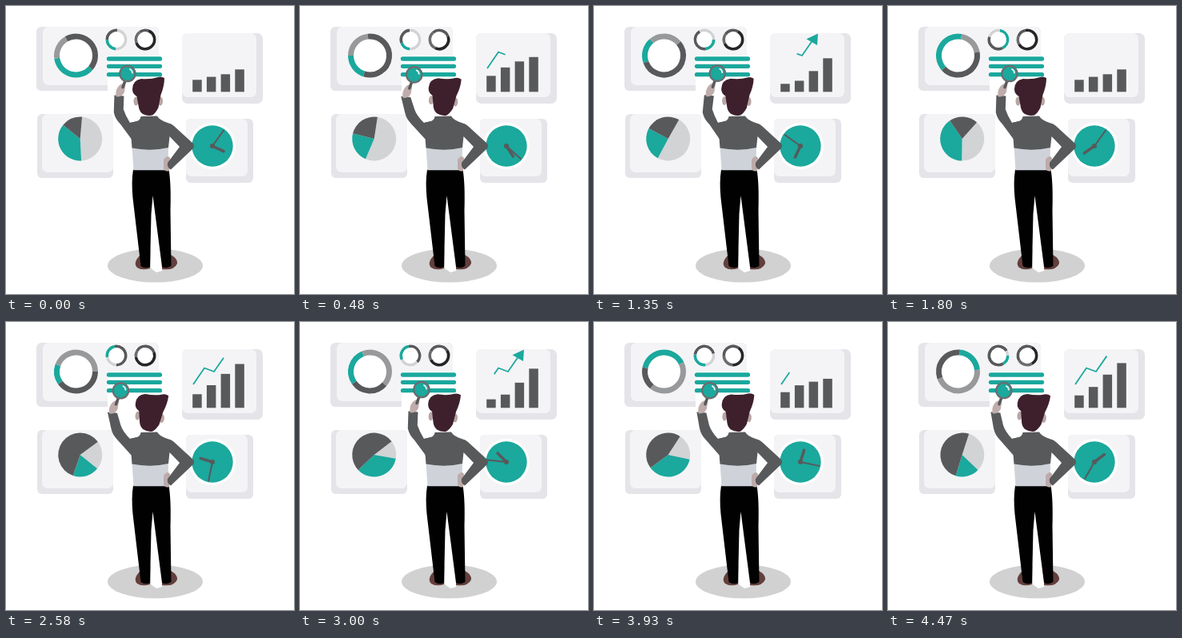
These frames come from a looping animation (360x360 px, 4.5 s). An HTML page:

```html
<!DOCTYPE html>
<html lang="en">
<head>
<meta charset="utf-8">
<title>Dashboard analysis</title>
<style>
html, body { margin: 0; width: 100%; height: 100%; overflow: hidden; background: #fff; }
svg { display: block; width: 100vw; height: 100vh; }
</style>
</head>
<body>
<svg viewBox="0 0 360 360">
  <!-- panels -->
  <g fill="#e4e4e9">
    <rect x="38" y="26" width="153" height="80" rx="6"/>
    <rect x="220" y="34" width="101" height="88" rx="7"/>
    <rect x="39" y="135" width="95" height="80" rx="6"/>
    <rect x="225" y="141" width="84" height="80" rx="6"/>
  </g>
  <g fill="#f4f4f6">
    <rect x="46" y="26" width="145" height="73" rx="7"/>
    <rect x="220" y="34" width="93" height="80" rx="7"/>
    <rect x="45" y="135" width="89" height="73" rx="7"/>
    <rect x="225" y="141" width="77" height="72" rx="7"/>
  </g>
  <path d="M127 62H196V110H127Z" fill="#fff"/>
  <g fill="#fff">
    <circle cx="87.5" cy="62" r="27.5"/>
    <circle cx="138" cy="42" r="14"/>
    <circle cx="174" cy="42" r="14"/>
    <circle cx="258" cy="175" r="29"/>
  </g>
  <g id="charts"></g>
  <path d="M128.500 66H192.500M128.500 75.300H192.500M128.500 85.700H192.500" stroke="#1ba89d" stroke-width="5.300" stroke-linecap="round"/>
  <g id="bars" fill="#58595b"></g>
  <path id="trend" fill="none" stroke="#1ba89d" stroke-width="1.800"/>
  <path id="head" d="M7.500 -10L-7 -3.200L6.500 4.500Z" fill="#1ba89d"/>

  <circle cx="258" cy="175" r="25.700" fill="#1ba89d"/>
  <g stroke="#58595b" stroke-linecap="round">
    <path id="minute" d="M258 175V151" stroke-width="2"/>
    <path id="hour" d="M258 175V159.500" stroke-width="3.500"/>
  </g>
  <circle cx="258" cy="175" r="3" fill="#58595b"/>

  <!-- person -->
  <ellipse cx="186.500" cy="324.500" rx="59.500" ry="21" fill="#d1d1d1"/>
  <path d="M181 236L185 236L196 311L195 331L188 333L181 328Z" fill="#fff"/>
  <path d="M168 311H180V328Q170 331 164 327Q158 321 168 311ZM195 311H206Q215 316 214 322Q210 331 195 329Z" fill="#633f3d"/>
  <path d="M159 204.500H203.500Q206.500 222 205.500 255L206.500 325Q200 329 195 326L183.500 237L181.500 260L180 326Q174 329 168.500 325L158.500 240Q156.500 220 159 204.500Z" fill="#010101"/>
  <path d="M157.500 176L203 175L202.500 205.300H159.500Z" fill="#cfd3d9"/>
  <path d="M197 192Q202 185 205 190L204 206Q199 208 197 203Z" fill="#bdabaa"/>
  <path d="M155 146L164 144Q168 142 168.500 138L189 137.500Q192 143 202 146Q207 147 210 150L234 172Q236 175 234 178L206 204.500Q201 202 202 196L217 176L204.500 163L203 177Q181 182 157.500 177.500Z" fill="#58595b"/>
  <path id="arm" fill="#58595b"/>
  <g id="skull">
    <ellipse cx="162.500" cy="119" rx="3" ry="5.500" fill="#b9a5a4"/>
    <ellipse cx="193" cy="119" rx="3" ry="5.500" fill="#b9a5a4"/>
    <path d="M158 104Q158 93 169 91Q181 92 190 89Q194 87.500 198 90Q198 100 193.500 111L190.500 127Q187 134 183 136.500Q177 138 171 135Q167 132 166 127L163.500 113Q158 110 158 104Z" fill="#3e202d"/>
  </g>
  <g id="glass">
    <path d="M-11.500 16Q-7 10 -2.500 14L-4 23Q-6 29 -14 29Q-16 22 -11.500 16Z" fill="#bfadab"/>
    <path d="M-3 9L-6 17" stroke="#58595b" stroke-width="3.500" stroke-linecap="round"/>
    <circle r="9.700" fill="#1ba89d" stroke="#6b6c6f" stroke-width="2.200"/>
    <path d="M3 -5.500Q6 -4 6 -1" fill="none" stroke="#e6f5f3" stroke-width="1.800" stroke-linecap="round"/>
  </g>
</svg>
<script>
const LOOP = 4500, BEAT = 1800;
const DARK = '#58595b', TEAL = '#1ba89d', GREY = '#98999b', LIGHT = '#d2d3d5';
const KEYS = [0, 480, 1350, 1800, 2580, 3420, 4470];
const $ = id => document.getElementById(id);
const set = (el, name, value) => el.setAttribute(name, value);
const clamp = x => Math.max(0, Math.min(1, x));
const ease = x => (1 - Math.cos(Math.PI * clamp(x))) / 2;
const wave = (t, delay) => Math.sin(2 * Math.PI * (t - delay) / BEAT);

function add(parent, tag, attrs) {
  const el = document.createElementNS('http://www.w3.org/2000/svg', tag);
  for (const name in attrs) set(el, name, attrs[name]);
  return parent.appendChild(el);
}

// Smooth track through values at KEYS, without overshoot
function track(values) {
  const gap = i => KEYS[i + 1] - KEYS[i];
  const slope = i => (values[i + 1] - values[i]) / gap(i);
  const tangent = i => {
    if (i === 0) return slope(0);
    if (i === KEYS.length - 1) return slope(i - 1);
    const a = slope(i - 1), b = slope(i);
    return a * b <= 0 ? 0 : 2 * a * b / (a + b);
  };
  return t => {
    let i = 0;
    while (i < KEYS.length - 2 && t > KEYS[i + 1]) i++;
    const h = gap(i), u = clamp((t - KEYS[i]) / h), v = 1 - u;
    return values[i] * v * v * (1 + 2 * u) + values[i + 1] * u * u * (3 - 2 * u)
      + h * u * v * (tangent(i) * v - tangent(i + 1) * u);
  };
}

function arc(cx, cy, r, from, to) {
  const point = deg => {
    const a = deg * Math.PI / 180;
    return (cx + r * Math.sin(a)).toFixed(2) + ' ' + (cy - r * Math.cos(a)).toFixed(2);
  };
  return `${point(from)}A${r} ${r} 0 ${to - from > 180 ? 1 : 0} 1 ${point(to)}`;
}

// Each chart: edges are the start angles of its slices, clockwise
const charts = [
  { x: 87.5, y: 62, r: 24, w: 7, colors: [TEAL, GREY, DARK], edges: [
    track([130, 198, 250, 228, 235, 235, 365]),
    track([262, 270, 320, 370, 290, 400, 445]),
    track([330, 354, 410, 440, 450, 545, 610])] },
  { x: 138, y: 42, r: 11.7, w: 3.6, colors: [TEAL, DARK, LIGHT], edges: [
    track([183, 183, 90, 8, -100, -130, -270]),
    track([270, 250, 175, 155, -10, -10, -210]),
    track([365, 355, 330, 287, 180, 100, 60])] },
  { x: 174, y: 42, r: 11.7, w: 3.6, colors: ['#6b6c6e', DARK, '#262628'], edges: [
    track([250, 205, 245, 240, 260, 215, 150]),
    track([325, 320, 305, 290, 300, 290, 240]),
    track([380, 430, 390, 350, 430, 400, 390])] },
  { x: 92.7, y: 166, r: 27.5, w: 0, colors: [LIGHT, TEAL, DARK], edges: [
    t => 5 + 49 * ease(t < 2700 ? t / 2700 : 2 - t / 2700),
    track([177, 203, 208, 181, 129, 84, 134]),
    track([309, 284, 298, 326, 199, 254, 197])] }
];
for (const c of charts) {
  c.parts = c.colors.map(color => add($('charts'), 'path', c.w
    ? { fill: 'none', stroke: color, 'stroke-width': c.w }
    : { fill: color }));
}

function drawChart(c, t) {
  const at = c.edges.map(edge => edge(t));
  at.push(at[0] + 360);
  c.parts.forEach((part, i) => {
    const line = arc(c.x, c.y, c.r, at[i], at[i + 1]);
    set(part, 'd', c.w ? 'M' + line : `M${c.x} ${c.y}L${line}Z`);
  });
}

const bars = [[15, 5, 0], [22, 8.8, 110], [31.5, 11, 300], [42, 14, 450]].map(([mid, amp, delay], i) => ({
  mid, amp, delay, el: add($('bars'), 'rect', { x: 233.2 + i * 17.7, width: 11.5 })
}));

// Part of the trend line between two fractions of its length
const TREND = [[234, 78], [248, 57.5], [260, 62], [273.5, 42.5]];
function trendPart(from, to) {
  const len = TREND.slice(1).map((p, i) => Math.hypot(p[0] - TREND[i][0], p[1] - TREND[i][1]));
  const total = len.reduce((a, b) => a + b);
  let done = 0, d = '';
  len.forEach((l, i) => {
    const a = clamp((from * total - done) / l), b = clamp((to * total - done) / l);
    const mix = u => TREND[i].map((v, k) => (v + (TREND[i + 1][k] - v) * u).toFixed(2)).join(' ');
    if (b > a) d += (d ? 'L' : `M${mix(a)}L`) + mix(b);
    done += l;
  });
  return d;
}

function draw(t) {
  const beat = t % BEAT;
  charts.forEach(c => drawChart(c, t));
  bars.forEach(b => {
    const h = b.mid + b.amp * wave(t, b.delay);
    set(b.el, 'y', 107.3 - h);
    set(b.el, 'height', h);
  });

  set($('trend'), 'd', trendPart(ease((beat - 900) / 900), ease(beat / 900)));
  const size = ease((beat - 880) / 250) * (1 - ease((beat - 1370) / 230));
  set($('head'), 'transform', `translate(272.5 44.5) scale(${size})`);

  set($('minute'), 'transform', `rotate(${35.5 + t / 5} 258 175)`);
  set($('hour'), 'transform', `rotate(${115 + t / 15} 258 175)`);

  // Arm sweep: the hand leads, the elbow follows less
  const dx = -6.5 * wave(t, 150), x = 148.7 + dx, y = 85 - dx * 0.15;
  set($('glass'), 'transform', `translate(${x} ${y})`);
  const cx = x - 10.5, cy = y + 27, ex = 136 + dx * 0.4;
  set($('arm'), 'd', `M${cx - 6} ${cy}L${cx + 6} ${cy + 1}L${ex + 9.5} 129`
    + `Q${ex + 12} 137 155 146L168 143L166 172L158 168L${ex + 6} 148`
    + `Q${ex - 1} 141 ${ex - 2.5} 133Z`);
  set($('skull'), 'transform', `rotate(${3.2 + 3.4 * wave(t, 350)} 180 136)`);
}

function tick(now) {
  draw(now % LOOP);
  requestAnimationFrame(tick);
}
draw(0);
requestAnimationFrame(tick);
</script>
</body>
</html>
```
